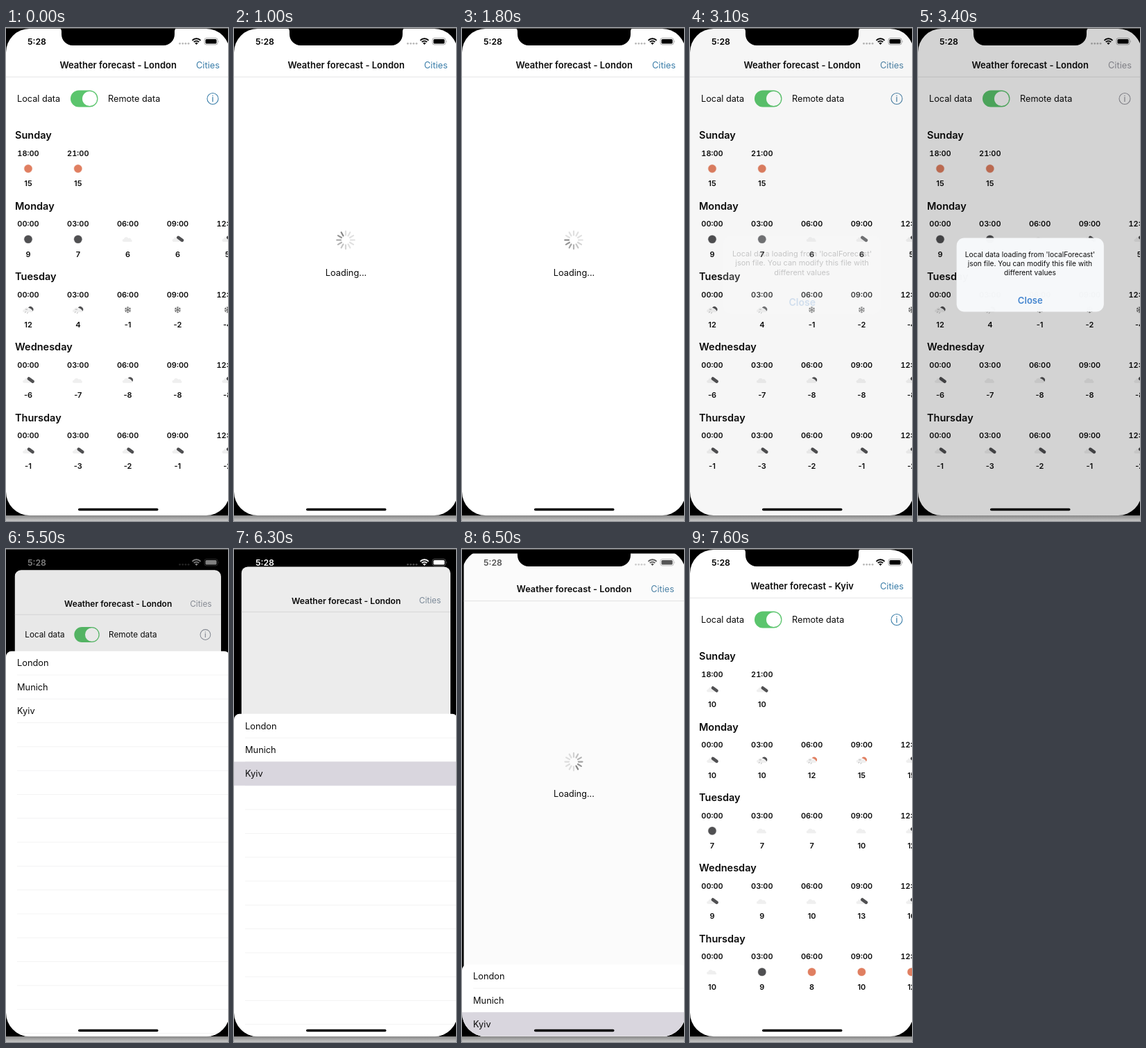
These frames come from a looping animation (320 by 708 pixels, 8900 ms). An HTML page:

```html
<!DOCTYPE html>
<html lang="en">
<head>
<meta charset="utf-8">
<title>Weather forecast</title>
<style>
  html, body { margin: 0; width: 100%; height: 100%; overflow: hidden; background: #000; }
  svg { display: block; width: 320px; height: 708px; font-family: Inter, Roboto, sans-serif; }
  text { fill: #0b0b0b; }
  .hour { font-variant-numeric: tabular-nums; }
  svg { --tint: #3b7ea9; --status: #000; }
  .tint text, text.tint { fill: var(--tint); }
  .tint circle { stroke: var(--tint); }
  .status text, .status .fill { fill: var(--status); }
  .status .line { stroke: var(--status); }
</style>
</head>
<body>
<svg id="stage" viewBox="0 0 320 708"></svg>
<script>
const LOOP = 8900, STEP = 100;
const SHEET_TOP = 45, SHEET_TRAVEL = 656, ROW = 34.3;
const DARK = '#505052', SUN = '#e07f61', PALE = '#efefef';

// Letters: s sun, m moon, c cloud, b broken clouds, f few clouds, n night rain, d day rain, x snow
const FORECASTS = {
  London: ['s15 s15', 'm9 m7 c6 b6 b5', 'n12 n4 x-1 x-2 x-4', 'b-6 c-7 f-8 c-8 b-8', 'b-1 b-3 b-2 b-1 b-2'],
  Kyiv: ['b10 b10', 'b10 n10 d12 d15 b15', 'm7 c7 c7 c10 b12', 'b9 c9 c10 b13 b10', 'c10 m9 s8 s10 s12']
};
const DAYS = ['Sunday', 'Monday', 'Tuesday', 'Wednesday', 'Thursday'];

// Text placed by its vertical centre
const text = (x, y, size, str, weight = 400, anchor = 'start', extra = '') =>
  `<text x="${x}" y="${y + size * 0.36}" font-size="${size}" font-weight="${weight}" text-anchor="${anchor}" ${extra}>${str}</text>`;
const rect = (x, y, w, h, fill, rx = 0, extra = '') =>
  `<rect x="${x}" y="${y}" width="${w}" height="${h}" fill="${fill}" rx="${rx}" ${extra}/>`;
const disc = color =>
  `<circle r="6.3" fill="${color}" opacity=".25"/><circle r="5.7" fill="${color}"/>`;
const dome = color => `<path d="M0-3a4 4 0 1 1 6.5 5q-1.500-4-6.500-5z" fill="${color}"/>`;
const cloud = `<path d="M-6 3.6a2 2 0 0 1 .3-4 3.6 3.6 0 0 1 6.7-.8 2.5 2.5 0 0 1 4 2 1.5 1.5 0 0 1 .3 2.8z" fill="${PALE}"/>`;
const drops = '<path d="M-3.500 2.500l-1 2M-.5 3.500l-1 2M-4-.5h3" stroke="#b5b5b5" fill="none"/>';
const flake = [0, 60, 120].map(a =>
  `<path transform="rotate(${a})" d="M0-4.6V4.6M-1.5-4L0-2.6 1.5-4M-1.5 4L0 2.6 1.5 4" stroke="#666" stroke-width=".9" fill="none"/>`).join('');

const ICONS = {
  s: disc(SUN),
  m: disc(DARK),
  c: cloud,
  b: cloud + `<path d="M1-2.500L6.500 1.500" stroke="${DARK}" stroke-width="4.600" stroke-linecap="round"/>`,
  f: cloud + dome(DARK),
  n: cloud + dome(DARK) + drops,
  d: cloud + dome(SUN) + drops,
  x: flake
};

function forecast(city) {
  return DAYS.map((day, d) => {
    const y = 154 + d * 101.35;
    const cells = FORECASTS[city][d].split(' ').map((cell, i) => {
      const x = 32 + i * 71.8;
      const hour = String((d ? 0 : 18) + i * 3).padStart(2, '0');
      return text(x, y + 26, 11, hour + ':00', 600, 'middle', 'class="hour"') +
        `<g transform="translate(${x} ${y + 48})">${ICONS[cell[0]]}</g>` +
        text(x, y + 69.3, 11, cell.slice(1), 600, 'middle');
    });
    return text(13, y, 14.5, day, 600) + cells.join('');
  }).join('');
}

const controls = text(16, 101.5, 12.7, 'Local data') + text(147, 101.5, 12.7, 'Remote data') +
  rect(93, 89.5, 39.5, 24, '#5bc56d', 12, 'id="track"') +
  '<circle id="knob" cy="101.5" r="10.6" fill="#fff"/>' +
  '<g class="tint"><circle cx="298" cy="101.5" r="8" fill="none" stroke-width="1.1"/>' +
  text(298, 101.7, 11.5, 'i', 500, 'middle') + '</g>';

const spokes = Array.from({ length: 12 }, (_, i) =>
  `<path class="spoke" transform="rotate(${i * 30})" d="M0-7V-12.7"/>`).join('');

const cities = ['London', 'Munich', 'Kyiv'].map((name, i) => text(16, ROW * (i + 0.5), 12.8, name)).join('');
const rules = Array.from({ length: 18 }, (_, i) => rect(16, ROW * (i + 1) - 0.4, 306, 0.8, '#f0f0f1')).join('');

const message = ["Local data loading from 'localForecast'", 'json file. You can modify this file with', 'different values'];

stage.innerHTML = `
<defs>
  <clipPath id="screen">${rect(0, 1, 322.5, 699, '#000', 34)}</clipPath>
  <clipPath id="cardClip">${rect(0, 1, 322.5, 740, '#000', 0, 'id="cardShape"')}</clipPath>
  <linearGradient id="shade" x2="0" y2="1"><stop stop-color="#888"/><stop offset="1" stop-color="#c6c6c6"/></linearGradient>
</defs>
${rect(0, 0, 320, 708, '#000')}
${rect(0, 700, 320, 8, 'url(#shade)')}
<g clip-path="url(#screen)">
  <g id="card"><g clip-path="url(#cardClip)">
    ${rect(0, 0, 323, 741, '#fff')}
    ${rect(0, 69.8, 323, 0.8, '#dedee0')}
    ${text(161.7, 53, 13, '', 600, 'middle', 'id="title"')}
    ${text(274, 53, 12.8, 'Cities', 400, 'start', 'class="tint"')}
    <g id="content">${controls}
      ${Object.keys(FORECASTS).map(c => `<g id="days${c}">${forecast(c)}</g>`).join('')}
    </g>
    <g id="loading">
      <g transform="translate(161 304.5)" stroke="#858585" stroke-width="2.2" stroke-linecap="round">${spokes}</g>
      ${text(161.5, 351, 12.8, 'Loading...', 400, 'middle')}
    </g>
    ${rect(0, 0, 323, 741, '#000', 0, 'id="dim"')}
  </g></g>
  <g id="sheet">
    ${rect(0, 0, 322.5, 740, '#fff', 8)}
    ${rules}
    ${rect(0, ROW * 2, 323, ROW, '#d9d6de', 0, 'id="picked"')}
    ${cities}
  </g>
  <g id="alert">
    ${rect(56.5, 302, 210.5, 105, '#f7f9fb', 11, 'fill-opacity=".98"')}
    ${message.map((m, i) => text(161.5, 326 + i * 12.5, 10.15, m, 400, 'middle')).join('')}
    ${text(161.8, 391, 13, 'Close', 600, 'middle', 'style="fill:#4586cf"')}
  </g>
</g>
<path d="M75 0q5 0 5 5v4a16 16 0 0 0 16 16h131a16 16 0 0 0 16-16v-4q0-5 5-5z"/>
${rect(0, 0, 320, 1, '#555')}
<g class="status">
  ${text(44.5, 19.3, 12.3, '5:28', 600, 'middle')}
  <g opacity=".28">${[0, 1, 2, 3].map(i => `<circle class="fill" cx="${250.5 + i * 4.2}" cy="22.3" r="1.4"/>`).join('')}</g>
  <g class="line" fill="none" stroke-width="1.9"><path d="M268.5 17.8a8.5 8.5 0 0 1 12 0M270.8 20.2a5.2 5.2 0 0 1 7.4 0"/></g>
  <path class="fill" d="M272.3 21.8a3.2 3.2 0 0 1 4.4 0l-2.2 2.3z"/>
  <rect class="line" x="286" y="14.5" width="19" height="9.5" rx="2.8" fill="none" stroke-width=".9" opacity=".36"/>
  <rect class="fill" x="287.5" y="16" width="16" height="6.5" rx="1.5"/>
  <path class="fill" d="M306.3 17.7q1.5 1.5 0 3.2z" opacity=".36"/>
</g>
${rect(104, 689.8, 115.5, 3.5, '#000', 1.75)}`;

const $ = id => document.getElementById(id);
const set = (id, attrs) => { for (const k in attrs) $(id).setAttribute(k, attrs[k]); };
const show = (id, on) => set(id, { display: on ? 'inline' : 'none' });
const clamp = x => Math.min(1, Math.max(0, x));
const within = (t, a, b) => t >= a && t < b;
const spokeNodes = document.querySelectorAll('.spoke');

// Critically damped spring from 0 to 1
function spring(ms, rate) {
  const x = Math.max(0, ms) * rate / 1000;
  return 1 - (1 + x) * Math.exp(-x);
}
function presence(t, start, end, rateIn, rateOut) {
  const p = spring(t - start, rateIn) * (1 - spring(t - end, rateOut));
  return p < 0.04 ? 0 : p;
}

function render(t) {
  const alert = presence(t, 3030, 4229, 11.2, 9);
  const sheet = presence(t, 5200, 6203, 11.1, 11.1);
  const loading = within(t, 900, 1100) || within(t, 1800, 2100) || within(t, 6200, 6600);
  const remote = !within(t, 900, 1800);
  const city = t < 6600 ? 'London' : 'Kyiv';

  $('title').textContent = 'Weather forecast - ' + city;
  show('content', !loading);
  show('loading', loading);
  for (const c in FORECASTS) show('days' + c, c === city);
  set('track', { fill: remote ? '#5bc56d' : '#e9e9ea' });
  set('knob', { cx: remote ? 120.6 : 105 });

  const head = 9 + Math.floor((t - 1800) * 12 / 1000);
  spokeNodes.forEach((node, i) => {
    const lag = (((head - i) % 12) + 12) % 12;
    node.setAttribute('opacity', Math.max(0.25, 1 - lag * 0.13));
  });

  const scale = 1 - 0.092 * sheet;
  set('card', { transform: `translate(161.5 ${1 + 34.7 * sheet}) scale(${scale}) translate(-161.5 -1)` });
  set('cardShape', { rx: 10 * clamp(sheet * 4) });
  set('dim', { opacity: 0.108 * sheet + 0.19 * alert });
  show('sheet', sheet > 0);
  set('sheet', { transform: `translate(0 ${SHEET_TOP + SHEET_TRAVEL * (1 - sheet)})` });
  show('picked', t >= 6300);

  const grow = t < 4200 ? 1 + 0.1 * (1 - alert) : 1;
  show('alert', alert > 0);
  set('alert', { opacity: clamp(t < 4200 ? alert * 1.1 : alert), transform: `translate(161.7 354.5) scale(${grow}) translate(-161.7 -354.5)` });

  const muted = clamp(Math.max(alert, sheet) * 1.1) * 100;
  const white = clamp((t - 5300) / 400) * (1 - clamp((t - 6300) / 300)) * 255;
  stage.style.setProperty('--tint', `color-mix(in srgb, #9a9aa2 ${muted}%, #3b7ea9)`);
  stage.style.setProperty('--status', `rgb(${white}, ${white}, ${white})`);
}

const begin = performance.now();
function tick() {
  const t = (performance.now() - begin) % LOOP;
  render(Math.floor(t / STEP) * STEP);
  requestAnimationFrame(tick);
}
tick();
</script>
</body>
</html>
```
